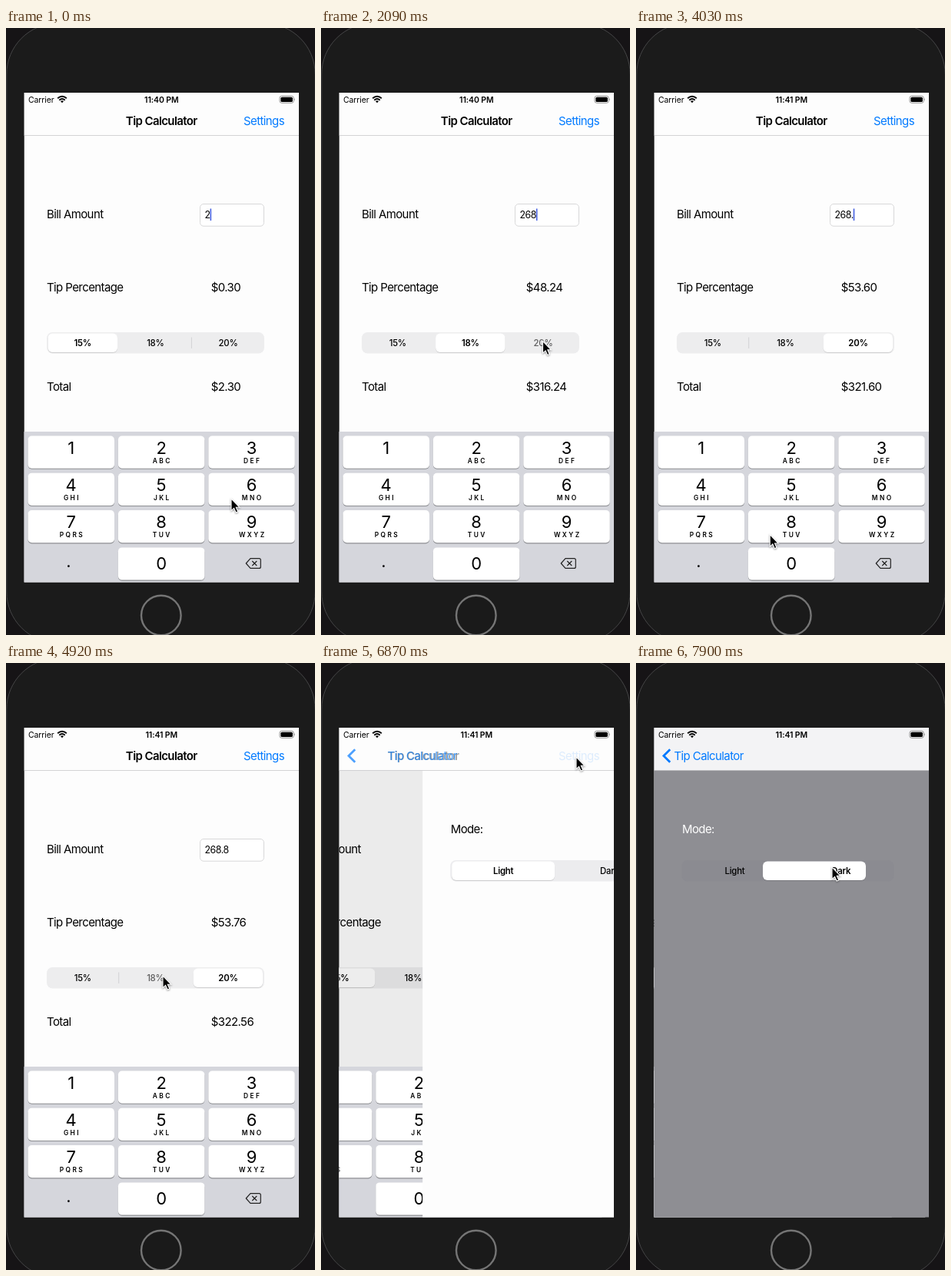
These frames come from a looping animation (402 px wide and 788 px high, 8 s). An HTML page:

```html
<!DOCTYPE html>
<html lang="en">
<head>
<meta charset="utf-8">
<title>Tip Calculator</title>
<style>
html, body { margin: 0; width: 100%; height: 100%; overflow: hidden; background: #161416; }
svg { display: block; width: 100%; height: 100%; }
text { font-family: Inter, "Open Sans", sans-serif; white-space: pre; }
.body { font-size: 15px; letter-spacing: -.04em; }
.field { font-size: 12.4px; letter-spacing: -.04em; }
.seg { font-size: 11.4px; font-weight: 500; letter-spacing: -.02em; text-anchor: middle; }
.status { font-size: 10.5px; letter-spacing: -.01em; }
.digit { font-size: 22px; text-anchor: middle; }
.abc { font-size: 8.4px; font-weight: 600; letter-spacing: 2.4px; text-anchor: middle; }
.bold { font-weight: 600; }
.mid { text-anchor: middle; }
.blue { fill: #007aff; }
</style>
</head>
<body>
<script>
const LOOP = 8000, STEP = 149, PUSH = 46, DARK = 52;
const SCREEN = { x: 23.5, y: 84, w: 357.5, h: 635.5 };

// State changes as [step, value]
const bills = [[0, '2'], [1, '26'], [5, '268'], [24, '268.'], [28, '268.8']];
const rates = [[0, 0], [11, 1], [15, 2], [34, 1], [38, 0]];
const percents = [15, 18, 20];
const keyPresses = [[1, 2, 6], [5, 6, 8], [28, 29, 8]];
const segTouches = [[10, 10, 1], [14, 14, 2], [33, 33, 1], [37, 38, 0]];
// Pointer stops as [step, x, y]
const stops = [
  [0, 293, 611], [2, 293, 612], [4, 206, 646], [6, 206, 646], [9, 198, 403],
  [11, 198, 405], [13, 288, 406], [16, 290, 408], [20, 109, 694], [22, 99, 705],
  [23, 92, 693], [25, 92, 694], [28, 203, 645], [30, 205, 645], [33, 204, 406],
  [35, 204, 407], [37, 100, 408], [39, 102, 408], [41, 334, 146], [43, 332, 122],
  [46, 332, 122], [51, 255, 265], [54, 255, 265]
];

const rect = (x, y, w, h, r, fill, more = '') =>
  `<rect x="${x}" y="${y}" width="${w}" height="${h}" rx="${r}" fill="${fill}" ${more}/>`;
const text = (x, y, cls, str, id = '') =>
  `<text x="${x}" y="${y}" class="${cls}" id="${id}">${str}</text>`;
const knob = (id, x, y, w) =>
  `<g id="${id}">${rect(x, y + .9, w, 24.6, 6, '#000', 'opacity=".13"')}${rect(x, y, w, 24.5, 6, '#fff')}</g>`;

function keypad() {
  const letters = ['', 'ABC', 'DEF', 'GHI', 'JKL', 'MNO', 'PQRS', 'TUV', 'WXYZ'];
  const key = (n, col, row, sub) => {
    const x = 28.5 + col * 117.4, y = 529.5 + row * 48.3, cx = x + 56.2;
    return rect(x, y + 1, 112.5, 42.3, 5, '#8d8e92') +
      rect(x, y, 112.5, 42.2, 5, '#fff', `id="key${n}"`) +
      text(cx, y + (n ? 23 : 28.2), 'digit', n) +
      (sub ? text(cx + 1.2, y + 35, 'abc', sub) : '');
  };
  return rect(-60, 524, 500, 196, 0, '#d5d6dc') +
    letters.map((s, i) => key(i + 1, i % 3, Math.floor(i / 3), s)).join('') +
    key(0, 1, 3) + text(81.5, 700, 'digit', '.') +
    `<path d="M318 688.6H329.3Q331.3 688.6 331.3 690.6V699.4Q331.3 701.4 329.3 701.4H318L312.3 695Z
      M320.3 692L326.3 698M326.3 692L320.3 698" fill="none" stroke="#222" stroke-width="1.2" stroke-linejoin="round"/>`;
}

const calculator = () =>
  rect(23.5, 84, 460, 640, 0, '#fdfdfd') +
  text(53, 247.3, 'body', 'Bill Amount') +
  rect(252.5, 228.5, 83, 28.7, 4.5, '#fff', 'stroke="#d8d8d9"') +
  text(258.5, 247, 'field', '', 'bill') +
  rect(0, 234.5, 1.6, 15.5, 0, '#4660e0', 'id="caret"') +
  text(53, 341.5, 'body', 'Tip Percentage') + text(266.8, 341.5, 'body', '', 'tip') +
  rect(53, 395, 283, 27.5, 7.5, '#ededee') +
  rect(146.2, 401.5, 1, 14.5, 0, '#d2d2d4', 'id="line0"') +
  rect(240.9, 401.5, 1, 14.5, 0, '#d2d2d4', 'id="line1"') +
  knob('knob', 54.6, 396.4, 90.4) +
  percents.map((p, i) => text(99.8 + i * 94.6, 413, 'seg', p + '%', 'pct' + i)).join('') +
  text(53, 470.8, 'body', 'Total') + text(266.8, 470.8, 'body', '', 'total') +
  rect(23.5, 84, 460, 640, 0, '#000', 'id="shade"') + keypad();

const settings = () =>
  rect(23.5, 84, 358, 636, 0, '#fdfdfd', 'id="page"') +
  text(60, 220.5, 'body', 'Mode:', 'mode') +
  rect(59.5, 256, 276, 27.5, 7.5, '#767680', 'opacity=".12"') +
  knob('modeKnob', 61.5, 257.4, 134) +
  text(128.5, 273.8, 'seg', 'Light', 'light') + text(266.7, 273.8, 'seg', 'Dark', 'dark');

const navbar = () =>
  rect(23.5, 84, 358, 55.3, 0, '#fdfdfd', 'id="nav"') +
  rect(23.5, 139, 358, .9, 0, '#cfcfd1', 'id="rule"') +
  text(29, 96.8, 'status', 'Carrier') + text(202.3, 96.9, 'status bold mid', '', 'clock') +
  `<g fill="none" stroke="#000" stroke-width="1.9">
    <path d="M67.2 91.3Q73 86.2 78.8 91.3M69.3 93.7Q73 90.4 76.7 93.7"/>
    <path d="M71 95Q73 93.4 75 95L73 97.2Z" fill="#000" stroke="none"/></g>` +
  rect(356, 88.3, 18.3, 9, 2.6, 'none', 'stroke="#888" stroke-width=".9"') +
  rect(357.4, 89.7, 15.5, 6.2, 1.5, '#000') +
  `<path d="M375.3 91.2Q376.8 92.8 375.3 94.4Z" fill="#888"/>` +
  text(202.3, 125.8, 'body bold mid', 'Tip Calculator', 'title') +
  `<path id="chevron" d="M44.3 112.2L36 120.5L44.3 128.8" fill="none" stroke="#007aff" stroke-width="2.8"/>` +
  text(49.5, 125.8, 'body blue', 'Tip Calculator', 'back') +
  text(309, 125.8, 'body blue', 'Settings', 'settings');

document.body.innerHTML = `<svg viewBox="0 0 402 788">
  <clipPath id="screen">${rect(SCREEN.x, SCREEN.y, SCREEN.w, SCREEN.h, 0, '#fff')}</clipPath>
  ${rect(0, 0, 402, 788, 0, '#161416')}
  ${rect(.8, -6, 401.4, 804, 66, '#1b1b1b', 'stroke="#454546" stroke-width="1"')}
  <circle cx="201.8" cy="762.5" r="25.8" fill="#1a1a1a" stroke="#757575" stroke-width="2.4"/>
  <g clip-path="url(#screen)">
    <g id="old">${calculator()}</g><g id="new">${settings()}</g>${navbar()}
  </g>
  <path id="pointer" d="M0 0V15.6L3.6 12.3L6.1 18L8.7 16.9L6.3 11.3H11Z" fill="#000" stroke="#fff"
    stroke-width="1.1" style="filter:drop-shadow(0 1px 1px #0006)"/>
</svg>`;

const $ = id => document.getElementById(id);
const set = (id, attrs) => { for (const k in attrs) $(id).setAttribute(k, attrs[k]); };
const move = (id, x, y = 0) => set(id, { transform: `translate(${x} ${y})` });
const lastIndex = (list, n) => list.findLastIndex(e => e[0] <= n);
const active = (list, n, v) => list.some(([a, b, w]) => n >= a && n <= b && w === v);
const slide = k => 1 - (1 - Math.min(Math.max(k / 2, 0), 1)) ** 2;
const mix = (a, b, u) => a + (b - a) * u;

function placePointer(n) {
  const i = Math.min(lastIndex(stops, n), stops.length - 2);
  const [n0, x0, y0] = stops[i], [n1, x1, y1] = stops[i + 1];
  let u = (n - n0) / (n1 - n0);
  u = u * u * (3 - 2 * u);
  move('pointer', mix(x0, x1, u), mix(y0, y1, u));
}

function showCalculator(n) {
  const [typed, bill] = bills[lastIndex(bills, n)];
  const r = lastIndex(rates, n), [since, pick] = rates[r];
  const from = r ? rates[r - 1][1] : pick;
  const tip = +bill * percents[pick] / 100;
  $('bill').textContent = bill;
  $('tip').textContent = '$' + tip.toFixed(2);
  $('total').textContent = '$' + (+bill + tip).toFixed(2);
  set('caret', {
    x: 258.5 + $('bill').getComputedTextLength(),
    opacity: (n - typed) * STEP % 1000 < 500 ? 1 : 0
  });
  move('knob', 94.5 * mix(from, pick, slide(n - since)));
  percents.forEach((_, i) => set('pct' + i, {
    'font-weight': 500, style: `font-weight:${i === pick ? 600 : 500}`,
    opacity: active(segTouches, n, i) ? .6 : 1
  }));
  set('line0', { opacity: pick === 2 ? 1 : 0 });
  set('line1', { opacity: pick === 0 ? 1 : 0 });
  for (const k of [6, 8]) set('key' + k, { fill: active(keyPresses, n, k) ? '#b5b9c2' : '#fff' });
}

function showPush(n) {
  const p = n < PUSH ? 0 : n > PUSH + 3 ? 1 : 1 - .304 ** (n - PUSH + 1);
  const q = p ** 1.2, dark = n >= DARK;
  move('old', -.3 * SCREEN.w * p);
  move('new', SCREEN.w * (1 - p));
  set('shade', { opacity: .1 * p });
  move('title', -107 * q);
  set('title', { opacity: 1 - q });
  move('back', 105 * (1 - q));
  set('back', { opacity: p });
  set('chevron', { opacity: p });
  set('settings', { opacity: n < 44 ? 1 : n < PUSH ? .3 : .12 * (1 - p) / .304 });
  set('nav', { fill: dark ? '#f3f3f5' : '#fdfdfd' });
  set('rule', { opacity: dark ? .4 : 1 });
  set('page', { fill: dark ? '#8e8e93' : '#fdfdfd' });
  set('mode', { fill: dark ? '#fff' : '#000' });
  move('modeKnob', 138 * slide(n - DARK));
  set('light', { style: `font-weight:${dark ? 500 : 600}` });
  set('dark', { style: `font-weight:${dark ? 600 : 500}`, opacity: n === DARK - 1 ? .6 : 1 });
}

function draw(t) {
  const n = Math.floor((t + 6) / STEP);
  $('clock').textContent = n < 22 ? '11:40 PM' : '11:41 PM';
  showCalculator(n);
  showPush(n);
  placePointer(n);
}

const start = performance.now();
function tick() {
  draw((performance.now() - start) % LOOP);
  requestAnimationFrame(tick);
}
tick();
</script>
</body>
</html>
```
